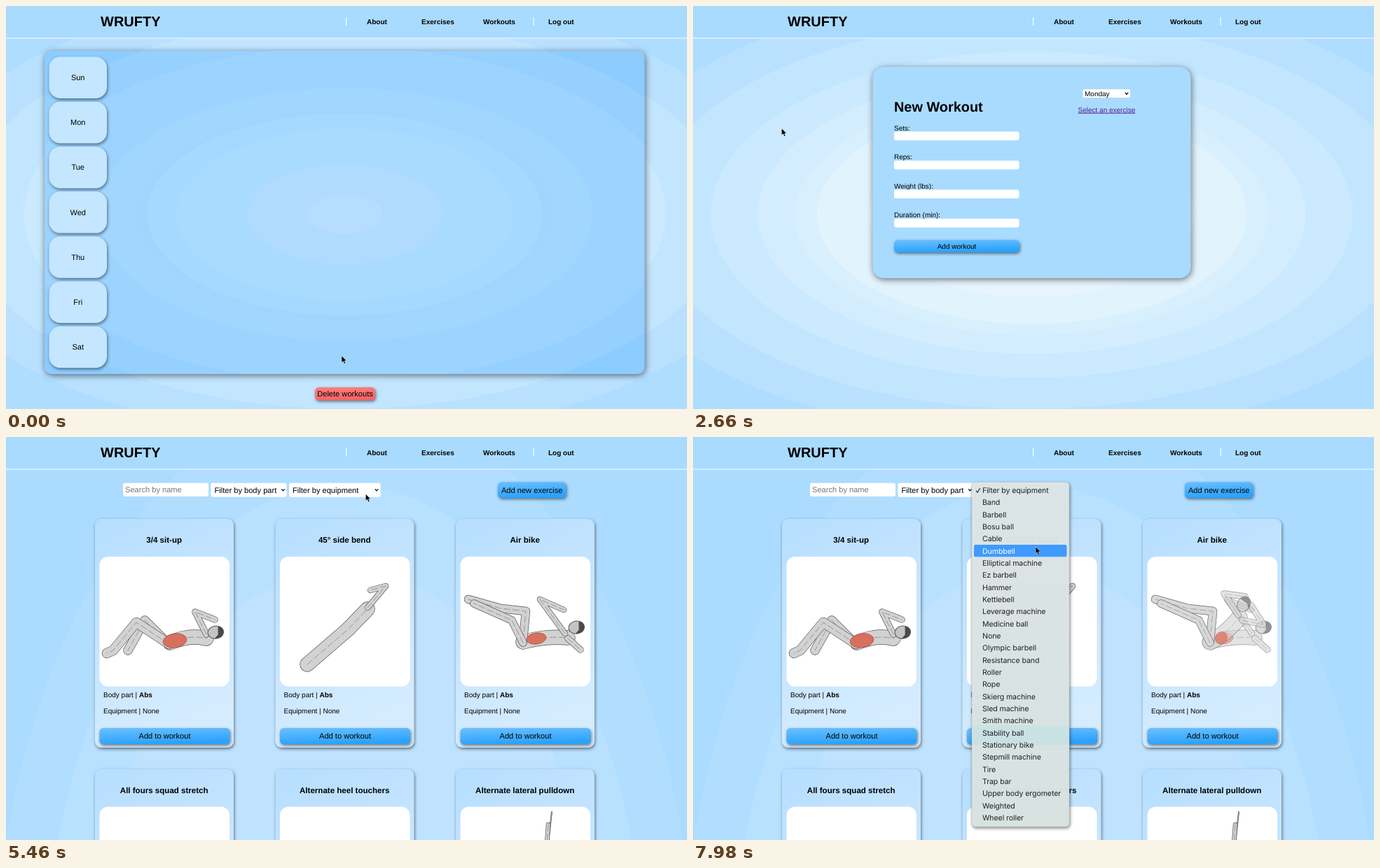
Recreate the animation shown at these times as an HTML page. Size 972 px wide and 576 px high, loop 8 s.

```html
<!DOCTYPE html>
<html lang="en">
<head>
<meta charset="utf-8">
<title>Workout planner</title>
<style>
  html, body { margin: 0; width: 100%; height: 100%; overflow: hidden; background: #a9dbff; }
  svg { display: block; width: 972px; height: 576px; }
  text { font-family: "Liberation Sans", Arial, sans-serif; text-rendering: geometricPrecision; white-space: pre; }
  #menu text { font-family: Inter, "Open Sans", sans-serif; font-size: 10.6px; letter-spacing: -.1px; fill: #222; }
  #menu text.on { fill: #fff; }
  .lift { filter: drop-shadow(1.5px 2px 2px rgba(0, 0, 0, .5)); }
  .float { filter: drop-shadow(1px 2px 5px rgba(0, 0, 0, .55)); }
  .figure path { fill: none; stroke-linecap: round; stroke-linejoin: round; }
</style>
</head>
<body>
<svg id="stage" viewBox="0 0 972 576"></svg>
<script>
const LOOP = 8000, STEP = 70;
const DAYS = ['Sun', 'Mon', 'Tue', 'Wed', 'Thu', 'Fri', 'Sat'];
const EQUIPMENT = ['Filter by equipment', 'Band', 'Barbell', 'Bosu ball', 'Cable', 'Dumbbell',
  'Elliptical machine', 'Ez barbell', 'Hammer', 'Kettlebell', 'Leverage machine', 'Medicine ball',
  'None', 'Olympic barbell', 'Resistance band', 'Roller', 'Rope', 'Skierg machine', 'Sled machine',
  'Smith machine', 'Stability ball', 'Stationary bike', 'Stepmill machine', 'Tire', 'Trap bar',
  'Upper body ergometer', 'Weighted', 'Wheel roller'];
const EXERCISES = ['3/4 sit-up', '45° side bend', 'Air bike',
  'All fours squad stretch', 'Alternate heel touchers', 'Alternate lateral pulldown'];
const ROW = 17.34, MENU_TOP = 67.3;

const rect = (x, y, w, h, r, fill, extra = '') =>
  `<rect x="${x}" y="${y}" width="${w}" height="${h}" rx="${r}" fill="${fill}" ${extra}/>`;
const text = (x, y, size, label, extra = '') =>
  `<text x="${x}" y="${y}" font-size="${size}" ${extra}>${label}</text>`;
const BOLD = 'font-weight="700"', MID = 'text-anchor="middle"';
const group = (id, content, extra = '') => `<g id="${id}" ${extra}>${content}</g>`;
const chevron = (x, y) =>
  `<path d="M${x - 2.2} ${y - 1.2}l2.2 2.4l2.2-2.4" fill="none" stroke="#111" stroke-width="1.3"/>`;
const button = (x, y, w, h, size, label, fill = 'url(#blue)') =>
  rect(x, y, w, h, 5.5, fill, 'class="lift"') + text(x + w / 2, y + h / 2 + size * .34, size, label, MID);

// Elliptical gradient made of flat bands: [outer radius, colour] pairs.
function bands(id, cy, ratio, list) {
  const max = list[list.length - 1][0];
  let inner = 0, stops = '';
  for (const [radius, color] of list) {
    stops += `<stop offset="${inner / max}" stop-color="${color}"/><stop offset="${radius / max}" stop-color="${color}"/>`;
    inner = radius;
  }
  return `<radialGradient id="${id}" gradientUnits="userSpaceOnUse" cx="0" cy="0" r="${max}"
    gradientTransform="translate(483.5 ${cy}) scale(1 ${ratio})">${stops}</radialGradient>`;
}
const linear = (id, from, to, x2) =>
  `<linearGradient id="${id}" x2="${x2}" y2="1"><stop stop-color="${from}"/><stop offset="1" stop-color="${to}"/></linearGradient>`;

const defs = '<defs>' +
  bands('page', 298, .509, [[80, '#fff'], [150, '#f6ffff'], [166, '#ecf8fe'], [182, '#e4f2fc'], [232, '#e8f5fe'],
    [307, '#e1f3fd'], [338, '#d8effe'], [391, '#d4edfe'], [458, '#cbe9ff'], [545, '#c3e6ff'], [625, '#b9e1ff'], [700, '#afddff']]) +
  bands('tall', 800, 1.7, [[360, '#bfe3ff'], [430, '#b8e1ff'], [500, '#b1deff'], [560, '#abdbff']]) +
  bands('panel', 298, .511, [[55, '#b6dcff'], [139, '#b1daff'], [240, '#a9dbff'], [282, '#a5d9ff'], [298, '#a1d5fd'],
    [353, '#a1d7ff'], [470, '#9cd3ff'], [540, '#95d0ff'], [600, '#8dccff']]) +
  linear('blue', '#6bc0ff', '#2ba2fb', .25) + linear('card', '#b6deff', '#d5ecff', .3) +
  linear('red', '#ff8080', '#f66464', .2) +
  linear('glass', '#dfe7e9', '#dbe5e4', 0) + '</defs>';

const nav = rect(0, 0, 972, 46, 0, '#a9dbff') + rect(0, 45.4, 972, 1.2, 0, '#eef6ff') +
  text(135, 28.6, 20, 'WRUFTY', BOLD) +
  [[515, 'About'], [593, 'Exercises'], [681, 'Workouts'], [774, 'Log out']]
    .map(([x, label]) => text(x, 25.5, 10, label, BOLD)).join('') +
  [485, 752.5].map(x => rect(x, 16, 1.2, 12, 0, '#fff')).join('');

const week = rect(55, 64, 856.5, 462, 10, 'url(#panel)', 'class="float"') +
  DAYS.map((day, i) => {
    const y = 72.5 + i * 64.2;
    return rect(61.5, y, 82.5, 59.5, 16, '#c4e6ff', `class="lift" id="${day}"`) + text(102.7, y + 33.5, 11, day, MID);
  }).join('') +
  button(441, 545, 86, 18.5, 11.1, 'Delete workouts', 'url(#red)');

const form = rect(256.5, 87, 454, 302, 16, '#a9dbff', 'class="float"') +
  text(287, 151, 19.9, 'New Workout', BOLD) +
  ['Sets:', 'Reps:', 'Weight (lbs):', 'Duration (min):'].map((label, i) =>
    text(287, 177.5 + i * 41.5, 10, label) + rect(287, 179.6 + i * 41.5, 178.5, 12.4, 3, '#fff')).join('') +
  button(287, 334.5, 179, 17.5, 10, 'Add workout') +
  rect(556.5, 119, 67.5, 12, 2.5, '#fff') + text(559, 128.6, 10, 'Monday') + chevron(619, 125) +
  text(549.5, 151.7, 10, 'Select an exercise', 'fill="#551a8b" text-decoration="underline"');

const filters = rect(167, 65.7, 122, 19.3, 3, '#fff') + text(170, 79, 11.1, 'Search by name', 'fill="#757575"') +
  rect(292.5, 65.7, 108, 20, 3, '#fff') + text(297.5, 79.5, 11.1, 'Filter by body part') + chevron(395.5, 75.7) +
  rect(404, 65.7, 130.5, 20, 3, '#fff') + text(409, 79.5, 11.1, 'Filter by equipment') + chevron(529, 75.7) +
  button(702, 64.5, 97.5, 22.5, 11.1, 'Add new exercise');

const limb = (d, w) => `<path d="${d}" stroke="#555" stroke-width="${w + 1.4}"/>` +
  `<path d="${d}" stroke="#d2d2d2" stroke-width="${w}"/>` +
  `<path d="${d}" stroke="#888" stroke-width=".8" stroke-dasharray="9 4"/>`;
const head = (x, y, turn) => `<g transform="translate(${x} ${y}) rotate(${turn})">` +
  '<ellipse rx="9" ry="11" fill="#c4c4c4" stroke="#555"/><path d="M-8-5Q-6-12 1-12Q11-10 9 3L4-3Z" style="fill:#4a4a4a"/></g>';
const abs = (x, y, rx, ry, turn = 0) =>
  `<ellipse cx="${x}" cy="${y}" rx="${rx}" ry="${ry}" fill="#d8705f" stroke="#a84b40" stroke-width=".7" transform="rotate(${turn} ${x} ${y})"/>`;
const pose = (id, content) => group(id, content, 'class="figure"');

const sitLegs = limb('M232 296L198 262L174 305', 12) + limb('M233 296L186 265L153 305L144 309', 13);
const bikeLegs = limb('M738 291L742 249L706 245L660 232', 11) + limb('M738 294L722 262L668 238', 10);
const figures =
  pose('sitDown', limb('M234 294Q262 282 286 288', 20) + sitLegs + abs(241, 291, 17, 10, -8) +
    limb('M286 282L270 250L298 261', 8) + head(299, 279, 80)) +
  pose('sitUp', limb('M235 295Q253 268 235 247', 23) + sitLegs + abs(231, 284, 8, 11) +
    head(222, 226, 0) + limb('M238 250L212 266L206 236', 9)) +
  pose('bendUp', limb('M430 325L488 275', 18) + limb('M488 275L532 236', 25) +
    limb('M532 235L547 258', 8) + head(544, 222, 25)) +
  pose('bendDown', limb('M430 325L488 275L516 246', 20) + limb('M516 244L542 213L520 219', 7)) +
  pose('bikeDown', limb('M738 293Q770 284 802 287', 20) + bikeLegs + abs(757, 288, 14, 8, -8) +
    limb('M802 288L820 304', 8) + limb('M798 281L762 232L796 247', 7) + head(814, 272, 80)) +
  pose('bikeUp', limb('M738 293Q760 282 780 258', 22) + bikeLegs + abs(754, 287, 8, 9, 30) +
    limb('M778 254L758 224L788 228', 8) + limb('M784 262L814 268L796 240', 8) + head(786, 239, 25)) +
  pose('lowA', limb('M234 580L247 567', 4) + head(480, 569, 0) + limb('M778.5 538V576', .4)) +
  pose('lowB', limb('M779 536L774 580', .6) + limb('M774 554L772 582', 5));

const cards = EXERCISES.map((name, i) => {
  const x = 127 + i % 3 * 257.5, y = 117 + (i > 2) * 357.5;
  return rect(x, y, 198, 327, 9, 'url(#card)', 'class="lift"') +
    text(x + 98.7, y + 34.2, 11.55, name, `${BOLD} ${MID}`) +
    rect(x + 6.5, y + 54, 185.5, 185.5, 12, '#fff') +
    text(x + 12, y + 254.7, 10, 'Body part | <tspan font-weight="700">Abs</tspan>') +
    text(x + 12, y + 277.7, 10, 'Equipment | None') +
    button(x + 6.5, y + 299, 186, 23, 11.1, 'Add to workout');
}).join('') + figures;

const menu = rect(398, 64.5, 139, 492.5, 5, 'url(#glass)', 'class="lift" stroke="#b9c3c8" stroke-width=".6" fill-opacity=".97"') +
  rect(399, 412, 137, 28, 0, '#a9e4ec', 'opacity=".3"') +
  rect(401, MENU_TOP, 132.5, ROW, 2.5, '#3f9aff', 'id="mark"') +
  '<path id="tick" d="M404 76.5l2 2.8l3.8-6" fill="none" stroke-width="1.2"/>' +
  EQUIPMENT.map((name, i) => text(413, 79.9 + i * ROW, 10.6, name)).join('');

const pointer = '<path d="M0 0V9.6L2.2 7.6L3.8 11.2L5.5 10.4L4 7H7Z" stroke="#fff" stroke-opacity=".7" stroke-width=".6"/>';

document.getElementById('stage').innerHTML = defs + rect(0, 0, 972, 576, 0, 'url(#page)') +
  group('backdrop', rect(0, 0, 972, 576, 0, 'url(#tall)')) + group('week', week) + group('form', form) +
  group('cards', cards) + group('filters', filters) + group('nav', nav) +
  group('menu', menu) + group('pointer', pointer);

const $ = id => document.getElementById(id);
const menuTexts = [...$('menu').querySelectorAll('text')];
const show = (id, on) => { $(id).style.display = on ? '' : 'none'; };
const fade = (id, amount) => { $(id).style.opacity = amount; };

// Linear interpolation through [time, ...values] keys.
function track(t, keys) {
  const n = keys.findIndex(key => key[0] > t);
  if (n < 0) return keys[keys.length - 1].slice(1);
  if (n === 0) return keys[0].slice(1);
  const a = keys[n - 1], b = keys[n], k = (t - a[0]) / (b[0] - a[0]);
  return a.slice(1).map((v, i) => v + (b[i + 1] - v) * k);
}

const PATH = [[0, 479, 500], [490, 430, 273], [840, 430, 273], [1680, 187, 200], [1890, 152, 189], [2380, 126.5, 175],
  [2800, 126.5, 175], [3640, 529, 141], [4130, 560, 149], [4550, 560, 149], [5250, 514, 82], [6090, 511.5, 80],
  [6160, 511.5, 80], [7070, 491.5, 139], [7560, 489.5, 156], [7980, 489, 157]];
const SIT = [[5880, 0], [6125, 1], [7250, 1], [7550, 0]];
const BIKE = [[5850, 0], [6130, 1], [6860, 1], [7150, 0], [7840, 0], [8120, 1]];

// Crossfade two poses, each staying solid through half of the change.
function crossfade(up, down, [k]) {
  fade(up, Math.min(1, k * 1.2));
  fade(down, Math.min(1, (1 - k) * 1.2));
}

function draw(now) {
  const t = Math.floor(now % LOOP / STEP) * STEP;
  const [x, y] = track(t, PATH);
  const loaded = t >= 4830, open = t >= 5740;
  show('week', t < 2520);
  show('form', t >= 2520 && t < 4480);
  show('filters', t >= 4480);
  show('backdrop', loaded);
  show('cards', loaded);
  show('menu', open);
  $('pointer').setAttribute('transform', `translate(${x} ${y})`);
  $('Mon').setAttribute('fill', x < 144 && t < 2520 ? '#cdeaff' : '#c4e6ff');
  if (!loaded) return requestAnimationFrame(draw);

  crossfade('sitUp', 'sitDown', track(t, SIT));
  crossfade('bikeUp', 'bikeDown', track(t, BIKE));
  crossfade('bendUp', 'bendDown', track(t, SIT));
  crossfade('lowA', 'lowB', track(t, SIT));

  const row = Math.max(0, Math.floor((y - MENU_TOP) / ROW));
  $('mark').setAttribute('y', MENU_TOP + row * ROW);
  $('tick').setAttribute('stroke', row ? '#222' : '#fff');
  menuTexts.forEach((node, i) => node.setAttribute('class', i === row ? 'on' : ''));
  requestAnimationFrame(draw);
}
requestAnimationFrame(() => draw(performance.now()));
</script>
</body>
</html>
```
